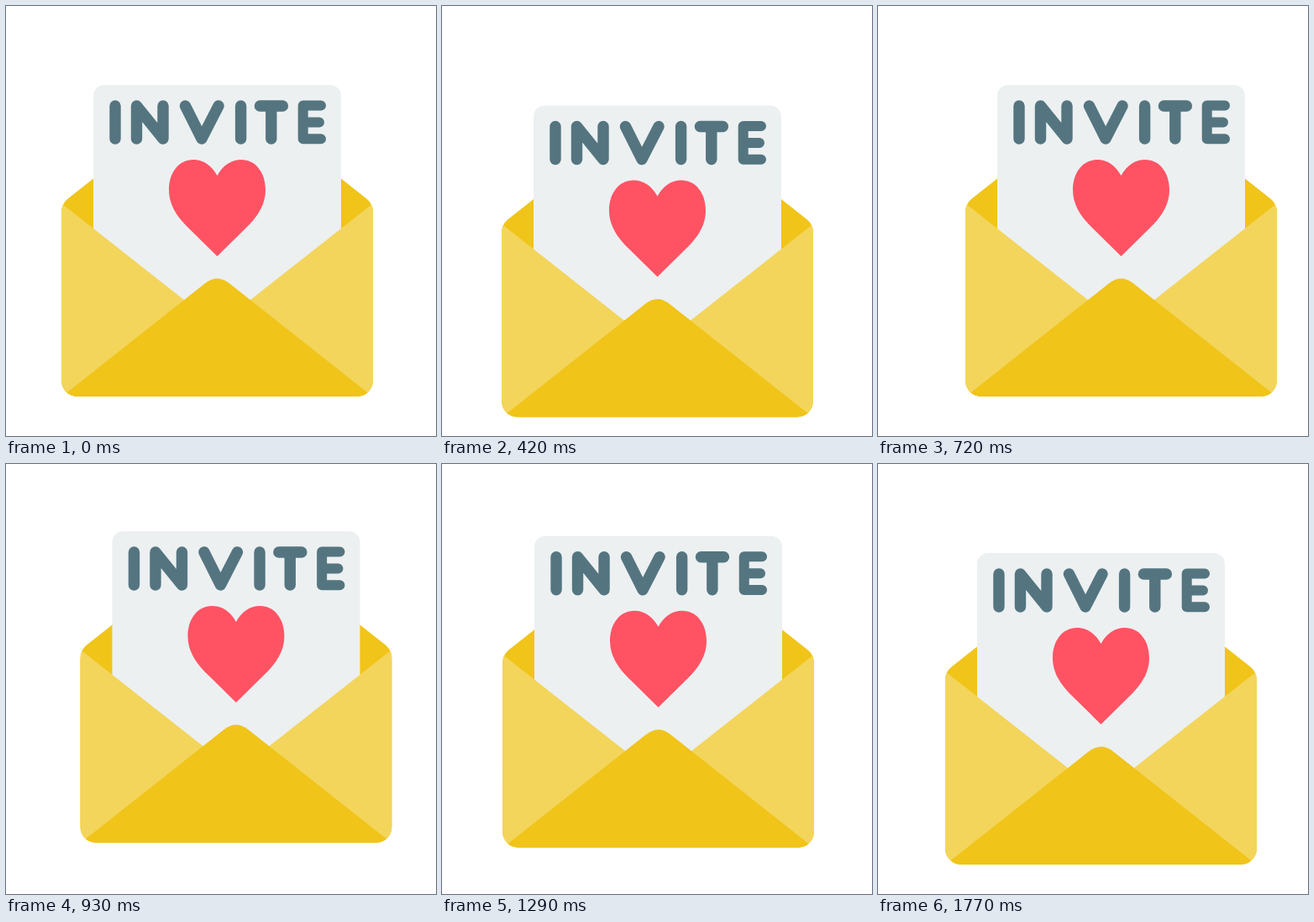
Write an HTML page that moves like this. It is 512 by 512 pixels and loops after 1800 ms.

```html
<!DOCTYPE html>
<html lang="en">
<head>
<meta charset="utf-8">
<title>Invite</title>
<style>
  html, body { margin: 0; width: 100%; height: 100%; overflow: hidden; background: #fff; }
  svg { display: block; width: 100%; height: 100%; }
</style>
</head>
<body>
<svg viewBox="0 0 512 512" role="img" aria-label="Invite">
  <defs>
    <clipPath id="body">
      <path id="outline" d="M104 205.5L73 230Q66 236 66 246V446a19 19 0 0 0 19 19H418a19 19 0 0 0 19-19V246Q437 236 430 230L399 205.5Z"/>
    </clipPath>
  </defs>
  <g id="letter">
    <use href="#outline" fill="#f0c419"/>
    <rect x="104" y="94" width="295" height="300" rx="13" fill="#ecf0f1"/>
    <g clip-path="url(#body)">
      <path fill="#f3d55b" d="M66 235L251.5 381L437 235V466H66Z"/>
      <path fill="#f0c419" d="M66 465.5L237 330.3Q251.5 318.8 266 330.3L437 465.5Z"/>
    </g>
    <path fill="#ff5364" d="M251.5 202C245 190 235 183 223 183C206 183 194 198 194 219C194 237 204 252 219 266L251.5 298L284 266C299 252 309 237 309 219C309 198 297 183 280 183C268 183 258 190 251.5 202Z"/>
    <g fill="none" stroke="#547580" stroke-width="13.4" stroke-linecap="round" stroke-linejoin="round">
      <path d="M130 119V158M155.5 158V119L187 158V119M213.5 119L233 158L253 119M279.6 119V158M302.4 119H329.4M315.8 119V158"/>
      <path stroke-width="12" d="M375 118.5H353.7V158.3H375M354 138.5H373"/>
    </g>
  </g>
</svg>
<script>
const LOOP = 1800, STEP = 30;
// drift offsets, evenly spaced over the loop
const driftX = [0, 2, 0.7, 18, 38, 25.5, 6, 4.3, 20, 25, 12.4];
const driftY = [0, 12, 25.4, 17, 0, -13.5, -11, -6.5, -22.5, -18.2, 16];

// Catmull-Rom spline through the values, p from 0 to 1
function spline(values, p) {
  const last = values.length - 1;
  const i = Math.floor(p * last), u = p * last - i;
  const [a, b, c, d] = [-1, 0, 1, 2].map(k => values[Math.min(Math.max(i + k, 0), last)]);
  return b + u / 2 * (c - a + u * (2 * a - 5 * b + 4 * c - d + u * (3 * (b - c) + d - a)));
}

const letter = document.getElementById('letter');

function draw() {
  const p = Math.floor(performance.now() % LOOP / STEP) * STEP / LOOP;
  letter.setAttribute('transform', `translate(${spline(driftX, p)} ${spline(driftY, p)})`);
  requestAnimationFrame(draw);
}
draw();
</script>
</body>
</html>
```
